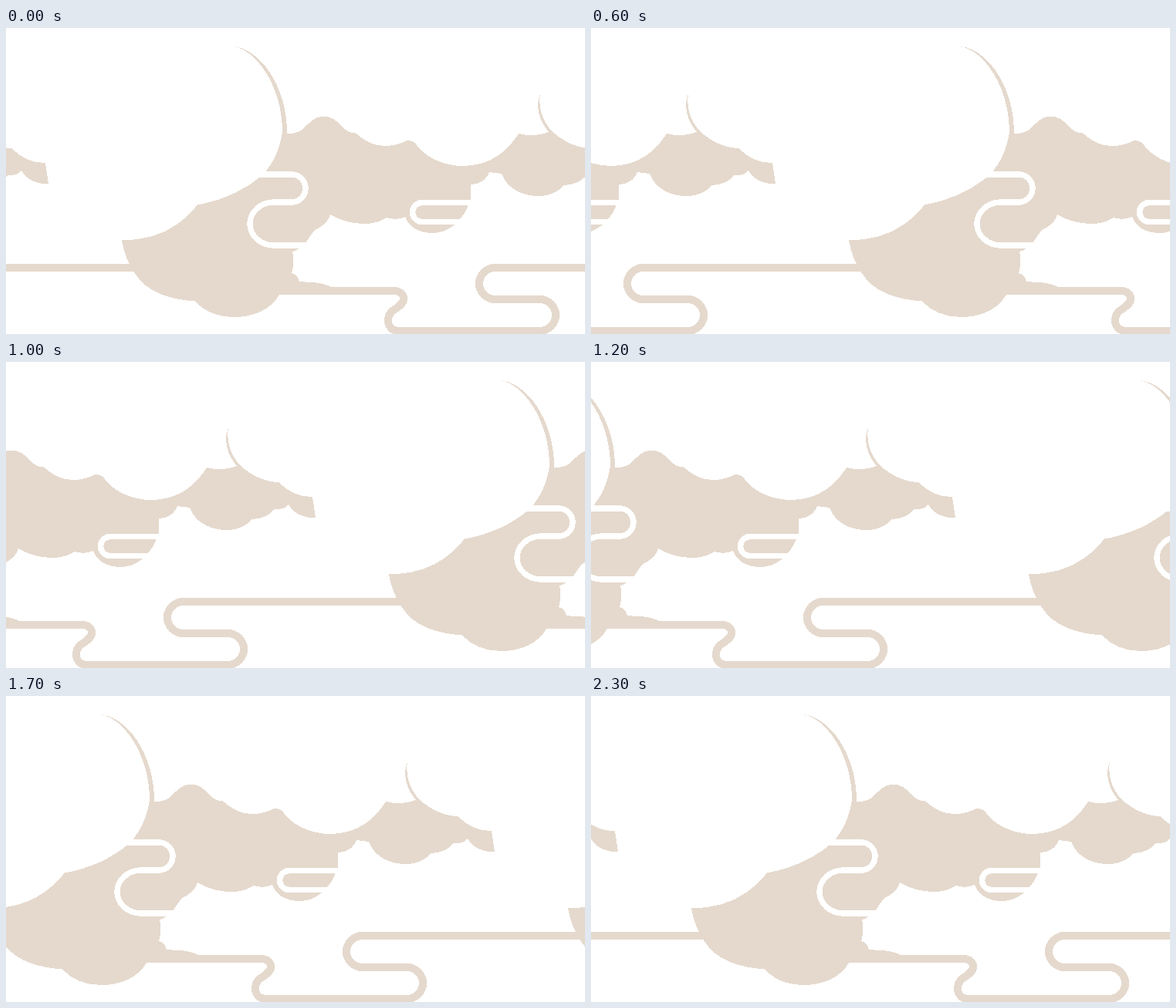
These frames come from a looping animation (750 px wide and 397 px high, 2.4 s). An HTML page:

```html
<!DOCTYPE html>
<html lang="en">
<head>
<meta charset="utf-8">
<title>Drifting clouds</title>
<style>
  html, body { margin: 0; width: 100%; height: 100%; overflow: hidden; background: #fff; }
  svg { display: block; width: 750px; height: 397px; shape-rendering: crispEdges; }
  .cloud { fill: #e5d9cd; }
  .band { fill: none; stroke: #e5d9cd; stroke-width: 10; }
  .wisp { fill: none; stroke: #fff; stroke-width: 7.5; }
</style>
</head>
<body>
<svg viewBox="0 0 750 397">
  <defs>
    <g id="tile">
      <!-- large cloud with its crescent -->
      <path class="cloud" d="M150 275.500 C190 275 221 263 248 229.500 C280 224 311 210 333 190
        Q353 168 358 135 C358 75 323 27 294 24 C328 26 364.500 75 364 137
        L400 200 L400 262 Q395 268 388 279 Q380 288 371 290 Q374 303 370 318
        Q378 320 380 329.500 Q409 329 421 336 L421 346 H354
        C343 365 322 375 295 375 C274 375 256 367 245 354.500
        C211 352 182 343 166 317 Q154 299 150 275.500Z"/>
      <!-- middle cloud -->
      <path class="cloud" d="M361 137 H366 Q379 137 386 130 C393 123 400 114.500 411 114.500
        C422 114.500 429 121 434 127 Q442 136 453 136.500 C465 147 476 153 491 153
        Q507 153 520 145.500 L529 148 C541 167 566 179 592 179 C626 179 649 161 664 137
        L668 150 L655 188 L642 189 L626 187 Q620 202 602 203
        L602 222 L600 226 Q596 242 580 256 Q568 266 552 266
        C535 266 521 258 517 245 Q506 250 493 246 Q480 254 465 254
        Q440 254 420 242 Q416 255 400 262 Q395 268 388 279 L360 285Z"/>
      <!-- right cloud with its thin crescent -->
      <path class="cloud" d="M664 137 Q684 142 703 135 Q689 118 689 100 Q689 92 692 85
        Q691 92 691.500 98 Q692 116 706 133 Q730 155 757 156 C771 169 782 175 801 175
        L805 202.500 Q780 202 770 185 Q764 192 752 191 Q742 203 723 204
        Q710 218 690 218 C666 218 648 206 642 189Z"/>
      <path class="band" d="M915 311 H633.500 A20.500 20.500 0 0 0 633.500 352 H691.500
        A20.500 20.500 0 0 1 691.500 393 H509 C500 393 495 387 495 379
        C495 363 515 364 515 351 C515 346 511 341 502 341 H350"/>
      <path class="wisp" d="M320 190 H370 A18 18 0 0 1 370 226 H347
        A31 28 0 0 0 347 282 H392"/>
      <path class="wisp" d="M606 226.500 H539 A12.500 12.500 0 0 0 539 251.500 H592"/>
    </g>
  </defs>
  <g id="scene">
    <use href="#tile"/>
    <use href="#tile" x="-750"/>
    <use href="#tile" x="-1500"/>
  </g>
</svg>
<script>
  const LOOP = 2400, STEP = 100;
  // step, distance travelled, speed in px per step
  const keys = [
    [0, 0, 21], [4, 110, 34], [8, 264, 41], [10, 346, 39],
    [14, 482, 33], [17, 578, 30], [23, 730, 20], [24, 750, 21]
  ];
  const scene = document.getElementById('scene');

  // cubic Hermite curve between neighbouring keys
  function distance(step) {
    const i = keys.findIndex(k => k[0] > step);
    const [s0, x0, v0] = keys[i - 1];
    const [s1, x1, v1] = keys[i];
    const span = s1 - s0, u = (step - s0) / span, w = 1 - u;
    return x0 * w * w * (1 + 2 * u) + x1 * u * u * (3 - 2 * u)
      + span * u * w * (v0 * w - v1 * u);
  }

  function draw() {
    const step = Math.floor(performance.now() % LOOP / STEP);
    scene.setAttribute('transform', `translate(${Math.round(distance(step))} 0)`);
    requestAnimationFrame(draw);
  }
  draw();
</script>
</body>
</html>
```
